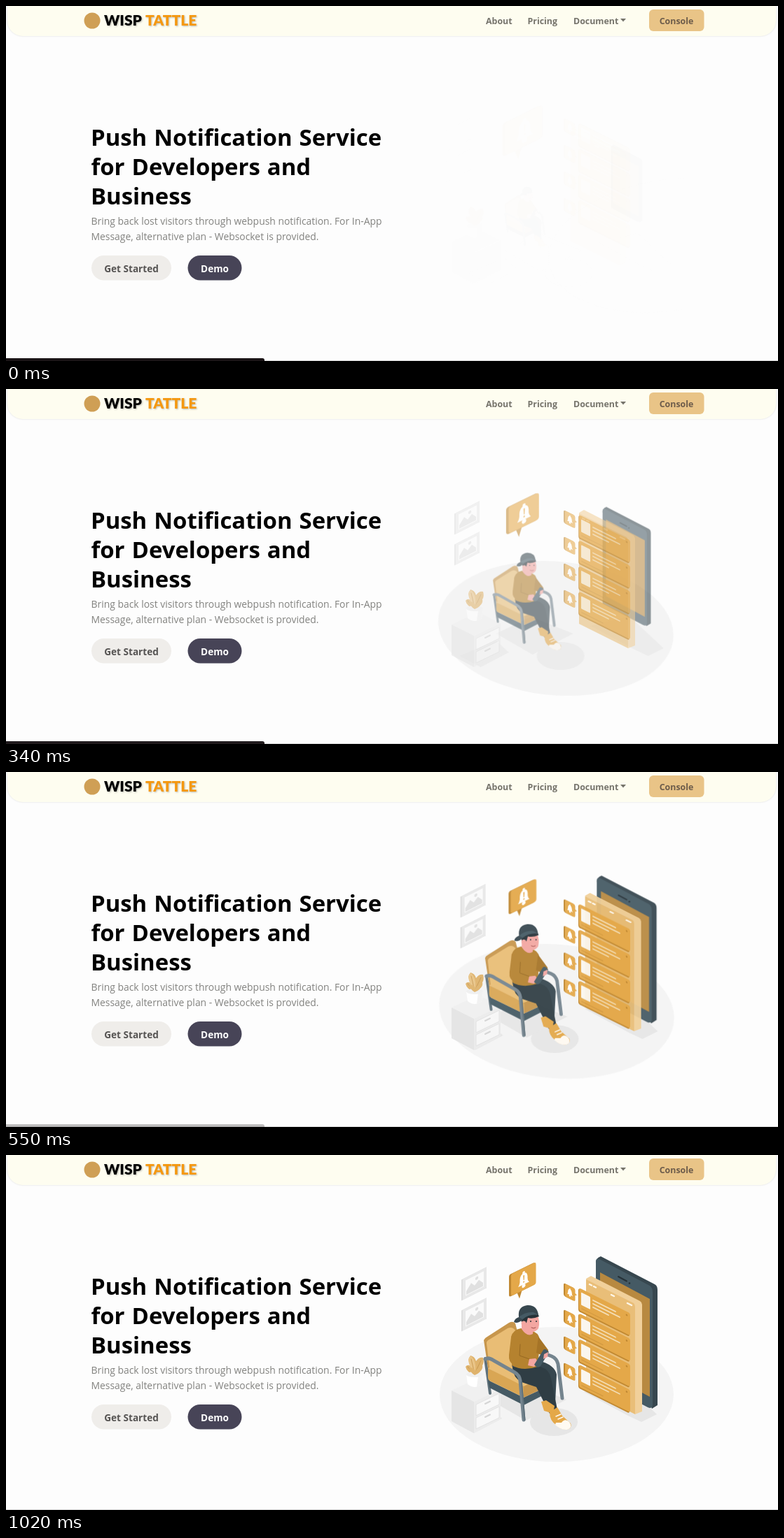
An HTML page that plays this animation: 1102 px wide and 508 px high, repeating every 3.76 s.

```html
<!DOCTYPE html>
<html lang="en">
<head>
<meta charset="utf-8">
<title>Push notification landing page</title>
<style>
  html, body { margin: 0; width: 100%; height: 100%; overflow: hidden; background: #fdfdfd; }
  svg { display: block; width: 1102px; height: 508px; font-family: "Open Sans", "Noto Sans", sans-serif; }
  .nav { font-size: 12.4px; font-weight: 700; fill: #75736b; }
  .title { font-size: 32.9px; font-weight: 700; word-spacing: 1.5px; }
  .lead { font-size: 13.9px; fill: #82827f; }
  .btn { font-size: 13.6px; font-weight: 700; text-anchor: middle; }
  .brand { font: 900 21px Lato, "Open Sans", sans-serif; filter: drop-shadow(1px 1px 1px #0004); }
  .line { fill: none; stroke-linecap: round; stroke-linejoin: round; }
  .gold { fill: #e4a849; }
  .amber { fill: #c08832; }
  .slate { fill: #455a64; }
  .ink { fill: #37474f; }
  .skin { fill: #f3a6a1; }
  #floor { transform-origin: 786px 342.5px; }
  #phone { transform-origin: 886px 254px; }
  #alert { transform-origin: 737px 178px; }
  #reader { transform-origin: 742px 304px; }
</style>
</head>
<body>
<svg viewBox="0 0 1102 508">
  <defs>
    <clipPath id="art"><rect x="604" y="100" width="364" height="360"/></clipPath>
    <g id="bell">
      <path d="M-8 7Q-5 4-5.5-2Q-5-9 0-9.5Q5-9 5.5-2Q5 4 8 7Z"/>
      <circle cy="-10" r="1.8"/><circle cy="9" r="2.6"/>
    </g>
    <g id="photo">
      <rect x="-1" width="36" height="30" fill="#dedede"/>
      <rect x="1" width="34" height="30" fill="#e8e8e8"/>
      <rect x="5" y="4" width="26" height="22" fill="#fafafa"/>
      <path d="M6 25V20L13 12L18 18L24 13L30 20V25Z" fill="#e0e0e0"/>
      <circle cx="21" cy="9" r="2.2" fill="#e0e0e0"/>
    </g>
    <g id="tag">
      <rect class="amber" width="15" height="18.500" rx="2.500"/>
      <path class="gold" d="M15 6L19 8L15 11Z"/>
      <rect class="gold" x="2" width="14.500" height="18.500" rx="2.500"/>
      <use href="#bell" transform="translate(9 9.300) scale(.5)" fill="#fff"/>
    </g>
    <g id="card">
      <rect class="amber" x="-1" y="1" width="73" height="33" rx="3"/>
      <rect class="gold" width="73" height="32" rx="3"/>
      <rect x="3" y="5" width="13" height="18" rx="1" fill="#faf6ee"/>
      <path class="line" d="M20 8H52M20 13H58M20 18H42" stroke="#f4dfb8" stroke-width="1.8"/>
      <path class="line" d="M4 28H34" stroke="#cf9740" stroke-width="1.2"/>
      <circle cx="68" cy="5" r="1.3" fill="#c08832"/>
    </g>
  </defs>

  <rect width="1102" height="508" fill="#fdfdfd"/>
  <rect x="2" y="-30" width="1097" height="73" rx="22" fill="#fefdf0" style="filter:drop-shadow(0 0 1px #0002)"/>
  <circle cx="123" cy="21" r="11.5" fill="#cf9f55"/>
  <g class="brand">
    <text x="140" y="28">WISP</text>
    <text x="199" y="28" fill="#f5980f">TATTLE</text>
  </g>
  <g class="nav">
    <text x="685" y="25.5">About</text>
    <text x="744.500" y="25.5">Pricing</text>
    <text x="810" y="25.5">Document</text>
    <path d="M877 18H885L881 22.5Z"/>
    <rect x="918" y="5" width="78.5" height="31" rx="6" fill="#e9c487"/>
    <text x="957" y="25.5" text-anchor="middle" fill="#6d5c4b">Console</text>
  </g>
  <g class="title">
    <text x="121" y="200">Push Notification Service</text>
    <text x="121.5" y="242">for Developers and</text>
    <text x="121" y="284">Business</text>
  </g>
  <g class="lead">
    <text x="121.5" y="313">Bring back lost visitors through webpush notification. For In-App</text>
    <text x="121.5" y="335">Message, alternative plan - Websocket is provided.</text>
  </g>
  <g class="btn">
    <rect x="122" y="357" width="114" height="35.5" rx="17.7" fill="#efedea"/>
    <text x="179" y="380.5" fill="#565453">Get Started</text>
    <rect x="259.5" y="357" width="77" height="35.5" rx="17.7" fill="#474457"/>
    <text x="298" y="380.5" fill="#fff">Demo</text>
  </g>

  <g clip-path="url(#art)">
    <ellipse id="floor" cx="786" cy="342.5" rx="167" ry="96.5" fill="#f4f4f4"/>

    <g id="shadows" fill="#e6e6e6">
      <ellipse cx="782" cy="382" rx="34" ry="20"/>
      <path d="M690 350L740 326L800 350L742 380Z"/>
      <path d="M825 339L888 373L907 382L929 371L880 325Z"/>
      <path d="M638 382L668 398L708 377L690 360Z"/>
    </g>

    <g id="cabinet">
      <path d="M636 337L674 319L706 335L668 353Z" fill="#f0f0f0"/>
      <path d="M636 337L668 353V398L636 381Z" fill="#e5e5e5"/>
      <path d="M668 353L706 335V378L668 398Z" fill="#ececec"/>
      <path id="drawer" d="M671 357L704 341V357L671 373Z" fill="#f8f8f8" stroke="#e2e2e2"/>
      <use href="#drawer" y="19"/>
      <path class="line" d="M684 356L691 352.5M684 375L691 371.5" stroke="#d5d5d5" stroke-width="2"/>
      <path d="M669 314Q658 312 656 303Q659 299 663 302Q658 293 663 287Q669 288 671 295Q675 289 681 290Q683 297 680 301Q682 309 669 314Z" fill="#dfb36c"/>
      <path d="M669 313Q661 304 660 293Q661 288 664 288Q673 297 669 313Z" fill="#e9c487"/>
      <path class="line" d="M669 313L664 292M669 313L678 294M668 313L659 303" stroke="#c3924a" stroke-width=".8"/>
      <path d="M657 314L659 328Q669 336 679 328L681 314Z" fill="#fff"/>
      <ellipse cx="669" cy="314" rx="12" ry="4" fill="#f0f0f0"/>
      <path d="M674 317Q678 317 681 314L679 328Q676 331 672 332Z" fill="#f1f1f1"/>
      <path d="M669 315Q662 311 661 304Q669 304 670 310Q673 303 679 304Q678 312 669 315Z" fill="#dfb36c"/>
    </g>

    <g id="photos">
      <use href="#photo" transform="matrix(1 -.51 0 1 651 178)"/>
      <use href="#photo" transform="matrix(1 -.51 0 1 651 222)"/>
    </g>

    <g id="alert">
      <path class="amber" d="M729 196L737 192L733 205.500Z"/>
      <g transform="matrix(1 -.49 0 1 718 171.5)">
        <rect class="amber" width="37" height="32" rx="3"/>
        <rect class="gold" x="3" y=".5" width="35.5" height="31.5" rx="3"/>
        <use href="#bell" transform="translate(21 17)" fill="#fff"/>
        <path d="M20.300 11H22.100L21.700 18H20.700Z" class="gold"/>
        <circle cx="21.2" cy="20.5" r="1" class="gold"/>
      </g>
    </g>

    <g id="phone">
      <path class="ink" d="M842 155Q841 148 849 145L926 185Q930 187 930 193V358L922 363Z"/>
      <path class="slate" d="M842 153Q842 146 849 150L919 187Q923 190 923 196V357Q923 364 916 361L842 322Z"/>
      <path d="M848 168L919 206V346L848 308Z" fill="#b88940"/>
      <path class="line" d="M874 174L886 180.5" stroke="#263238" stroke-width="2"/>
      <circle cx="890" cy="183.5" r="1.3" fill="#263238"/>
    </g>

    <g id="panel">
      <path d="M828 177L835 173L905 209Q908 211 908 214V367L898 371Z" fill="#f1d09a"/>
      <path d="M828 178L896 212Q898 214 898 217V371L828 336Z" fill="#e9be78"/>
      <path class="line" d="M833 185L836 186.5M839 188L842 189.5M864 200L868 202M887 212L893 215" stroke="#fdf6e8" stroke-width="2.5"/>
    </g>

    <g id="cards"></g>

    <g id="reader">
      <path class="line" d="M684 291L691 341" stroke="#5f717b" stroke-width="4"/>
      <path class="slate" d="M688 322L739 347L778 329V338L739 358L690 333Z"/>
      <path d="M682 265Q683 262 687 260L718 240Q724 237 727 241L741 295L737 321L688 305Z" fill="#c7964c"/>
      <path d="M686 269Q686 266 690 264L716 248Q723 245 727 251L745 306L728 322L690 304Z" fill="#e9bd75"/>
      <path d="M688 305L725 288L779 314L739 333Z" fill="#e9bd75"/>
      <path d="M688 305L739 331V347L692 324Q688 322 688 318Z" fill="#d9a654"/>
      <path d="M739 331L778 313V329L739 347Z" fill="#c7964c"/>
      <path class="line" d="M766 283L779 288Q786 291 788 299L794 348" stroke="#74848e" stroke-width="5"/>

      <path class="ink" d="M722 300L760 294Q783 300 786 314L784 355L771 359L763 324L738 317Q724 313 722 300Z"/>
      <path d="M728 303L763 303Q776 307 778 320L787 364L776 370L757 332L736 325Q724 319 723 304Z" fill="#2f3d44"/>
      <path class="gold" d="M764 353L771 351L783 359L781 370L768 366Z"/>
      <path class="gold" d="M776 368L787 361L794 373L806 384Q809 391 800 393Q791 393 785 386Q776 380 776 368Z"/>
      <path d="M793 383Q798 376 804 382Q810 390 801 393Q792 394 784 386L785 383Z" fill="#fffaf2"/>
      <path class="line" d="M785 374L792 371M788 378L795 375" stroke="#fffaf2" stroke-width="1.5"/>

      <path d="M721 260Q724 250 735 248L754 253Q763 257 762 270L759 303Q737 310 722 301Z" fill="#b5822f"/>
      <path class="skin" d="M736 242L753 246L752 256Q744 261 736 249Z"/>
      <path d="M760 260L774 279Q775 286 768 288L757 283Z" fill="#a57427"/>
      <path d="M721 261Q733 259 735 272L734 288L749 292L747 302L725 300Q717 297 718 286Z" fill="#b5822f"/>
      <path class="line" d="M734 271L733 287L747 292" stroke="#966822"/>
      <path class="skin" d="M747 292L756 291L760 297L754 303L745 301Z"/>
      <path class="slate" d="M754 300L767 279Q769 277 772 279L775 282L763 302Q760 305 757 303Z"/>
      <path class="skin" d="M768 285L774 282L773 289L767 292Z"/>

      <path class="skin" d="M736 230L758 228Q763 238 760 248Q756 254 749 253Q738 249 736 242Z"/>
      <path d="M733 228L758 225L761 231Q752 235 745 233L743 240L737 243Z" fill="#263238"/>
      <circle class="skin" cx="739" cy="241" r="3.4"/>
      <path class="ink" d="M732 232Q730 217 744 215Q758 214 760 229Q751 225 743 231L737 236Q730 242 725 239Q726 234 732 232Z"/>
      <path class="slate" d="M732 232Q741 224 753 225L760 229Q748 227 737 235Z"/>
      <circle cx="749" cy="238" r="1" fill="#263238"/>
      <circle cx="757" cy="238" r="1" fill="#263238"/>
      <path class="line" d="M750 247Q753 249 756 247" stroke="#a4504c"/>

      <path class="line" d="M684 292Q689 289 696 294L726 311Q733 315 734 323L739 379" stroke="#74848e" stroke-width="5"/>
      <path class="line" d="M736 325L740.5 379" stroke="#5f717b" stroke-width="2"/>
    </g>
  </g>

  <rect y="507" width="1102" height="1" fill="#d4d4d4"/>
  <path id="status" d="M0 504H366Q369 504 369 507V508H0Z" fill="#1a1416"/>
</svg>

<script>
  const LOOP = 3760, LEAD = 73;
  const STEPS = [0, 60, 130, 200, 270, 340, 410, 480, 550, 610, 680, 740, 810, 880, 950, 1020];
  const EASE = 'cubic-bezier(.36,-.01,.5,1.38)';
  const byId = id => document.getElementById(id);

  byId('cards').innerHTML = [0, 1, 2, 3].map(i => `
    <use href="#tag" transform="matrix(1 .5 0 1 796 ${183 + 38 * i})"/>
    <use href="#card" transform="matrix(1 .5 0 1 818 ${190 + 36.6 * i})"/>`).join('');

  const play = (id, keys, easing = EASE, timing = { duration: 1000 }) => {
    const anim = byId(id).animate(keys.map(k => ({ ...k, easing })), { fill: 'both', ...timing });
    anim.pause();
    return anim;
  };
  const enter = (id, from, to) =>
    play(id, [{ transform: from, opacity: 0 }, { transform: to, opacity: 1 }]);
  const zoom = (id, size) => enter(id, `scale(${size})`, 'scale(1)');
  const slide = (id, x, y) => enter(id, `translate(${x}px,${y}px)`, 'translate(0px,0px)');
  const lean = (x, deg) => `translateX(${x}px) skewX(${deg}deg)`;

  const anims = [
    play('floor', [
      { transform: lean(167, -20), opacity: 0 },
      { offset: .6, transform: lean(0, 10), opacity: 1 },
      { offset: .8, transform: lean(0, -2), opacity: 1 },
      { transform: lean(0, 0), opacity: 1 }
    ]),
    zoom('phone', .5),
    zoom('reader', .5),
    zoom('alert', 1.5),
    slide('photos', -23, 0),
    slide('panel', -23, 0),
    slide('shadows', 22, 0),
    slide('cards', 0, -23),
    slide('cabinet', 0, 0),
    play('status', [{ opacity: 1 }, { opacity: 0 }], 'linear', { delay: 330 + LEAD, duration: 300 })
  ];

  const start = performance.now();
  function draw() {
    const t = (performance.now() - start) % LOOP;
    const at = STEPS.filter(s => s <= t).pop();
    for (const a of anims) a.currentTime = at + LEAD;
    requestAnimationFrame(draw);
  }
  draw();
</script>
</body>
</html>
```
